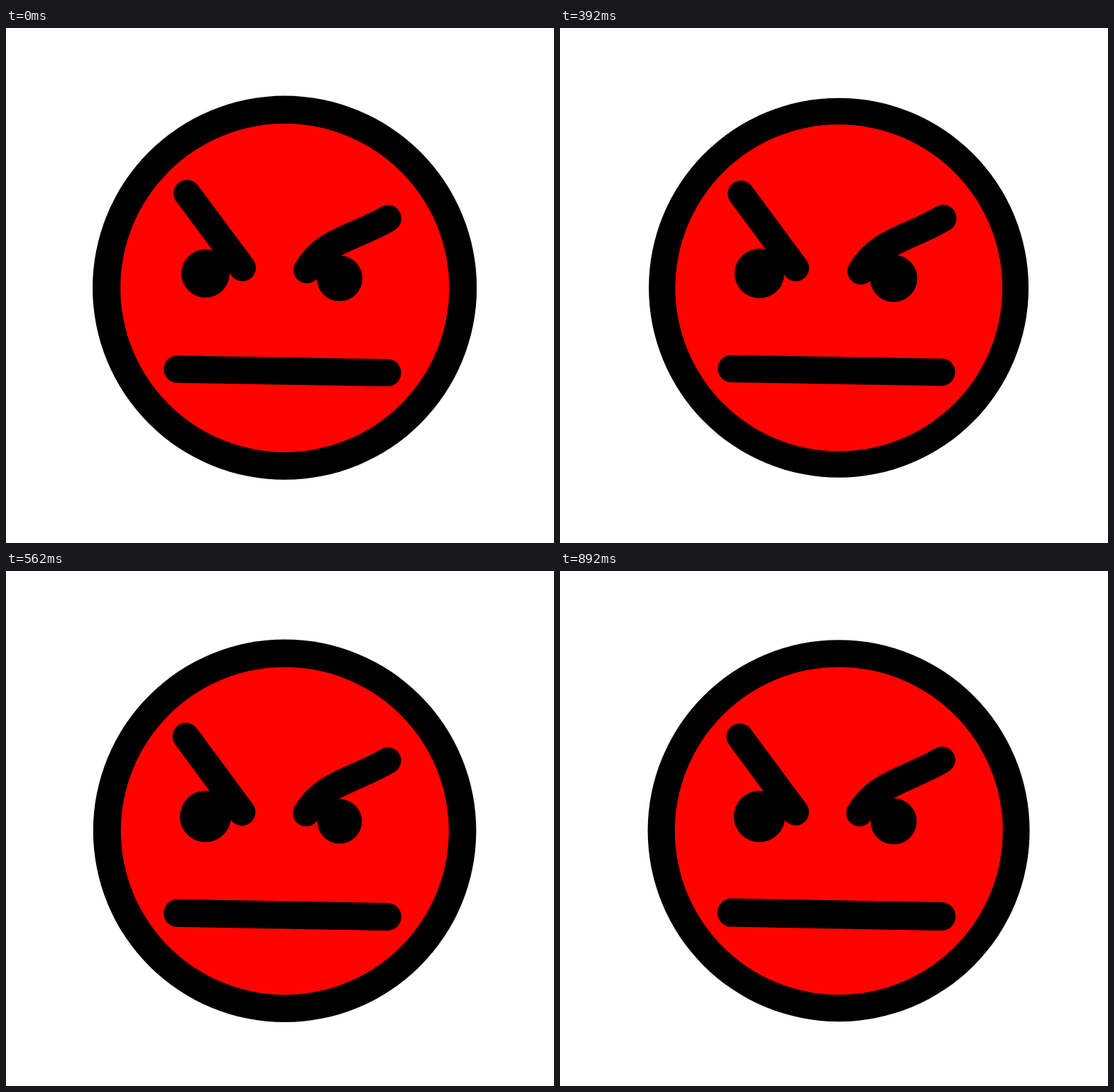
Write an HTML page with a canvas that moves like this. It is 772 px wide and 726 px high and loops after 960 ms.

```html
<!DOCTYPE html>
<html lang="en">
<head>
<meta charset="utf-8">
<title>Angry face</title>
<style>
  html, body { margin: 0; width: 100%; height: 100%; overflow: hidden; background: #fff; }
  canvas { display: block; }
</style>
</head>
<body>
<canvas id="stage" width="772" height="726"></canvas>
<script>
const ctx = document.getElementById('stage').getContext('2d');
const LOOP = 960;

// Each pose is held until its end time (ms), then the next one snaps in.
// rim: outer and inner radius; eyes: left and right radius;
// brows: x1, y1, x2, y2, radius; mouth: left y, right y, radius.
const poses = [
  { end: 130, rim: [270.6, 231.6], eyes: [34, 32.2],
    left: [255, 233, 333, 338, 19], right: [424, 341, 538, 268.5, 19], mouth: [481, 486, 19.3] },
  { end: 290, rim: [269, 229.8], eyes: [35, 32.4],
    left: [253, 234, 331.5, 340, 18.8], right: [422, 342, 538, 266.7, 19], mouth: [481.5, 487, 18.5] },
  { end: 460, rim: [267.5, 230.4], eyes: [35, 33.3],
    left: [254.8, 233.6, 332.3, 338.5, 18.6], right: [424, 342.7, 539.5, 268.3, 19], mouth: [480.2, 485.2, 19.3] },
  { end: 630, rim: [269.8, 231], eyes: [36.2, 31.4],
    left: [253.5, 233, 332.4, 340, 19], right: [422.7, 341.3, 538, 267.3, 18.7], mouth: [482.3, 487.4, 19.5] },
  { end: 790, rim: [267.8, 228.3], eyes: [34.2, 33.3],
    left: [255.6, 232.8, 333.3, 338, 18.8], right: [423.3, 342.3, 539, 267.7, 19.2], mouth: [480.8, 485.8, 19] },
  { end: LOOP, rim: [269, 231], eyes: [36.2, 32.4],
    left: [253.3, 233.7, 332, 340, 18.8], right: [421.9, 341.3, 538, 266.4, 18.8], mouth: [481.6, 487, 20] }
];

function disc(x, y, r, color) {
  ctx.fillStyle = color;
  ctx.beginPath();
  ctx.arc(x, y, r, 0, Math.PI * 2);
  ctx.fill();
}

// Round-capped stroke; the optional bend holds control offsets from both ends.
function bar(x1, y1, x2, y2, r, bend = [0, 0, 0, 0]) {
  ctx.lineWidth = r * 2;
  ctx.beginPath();
  ctx.moveTo(x1, y1);
  ctx.bezierCurveTo(x1 + bend[0], y1 + bend[1], x2 + bend[2], y2 + bend[3], x2, y2);
  ctx.stroke();
}

function draw(pose) {
  ctx.fillStyle = '#fff';
  ctx.fillRect(0, 0, 772, 726);
  ctx.strokeStyle = '#000';
  ctx.lineCap = 'round';

  disc(392.6, 366.2, pose.rim[0], '#000');
  disc(392.8, 366.4, pose.rim[1], '#ff0300');
  disc(281, 346, pose.eyes[0], '#000');
  disc(470, 353, pose.eyes[1], '#000');

  bar(...pose.left);
  bar(...pose.right, [25, -43, -46, 27.5]);
  const [yLeft, yRight, r] = pose.mouth;
  bar(241.6, yLeft, 537.4, yRight, r);
}

const start = performance.now();

function tick() {
  const t = (performance.now() - start) % LOOP;
  draw(poses.find(p => t < p.end));
  requestAnimationFrame(tick);
}
tick();
</script>
</body>
</html>
```
